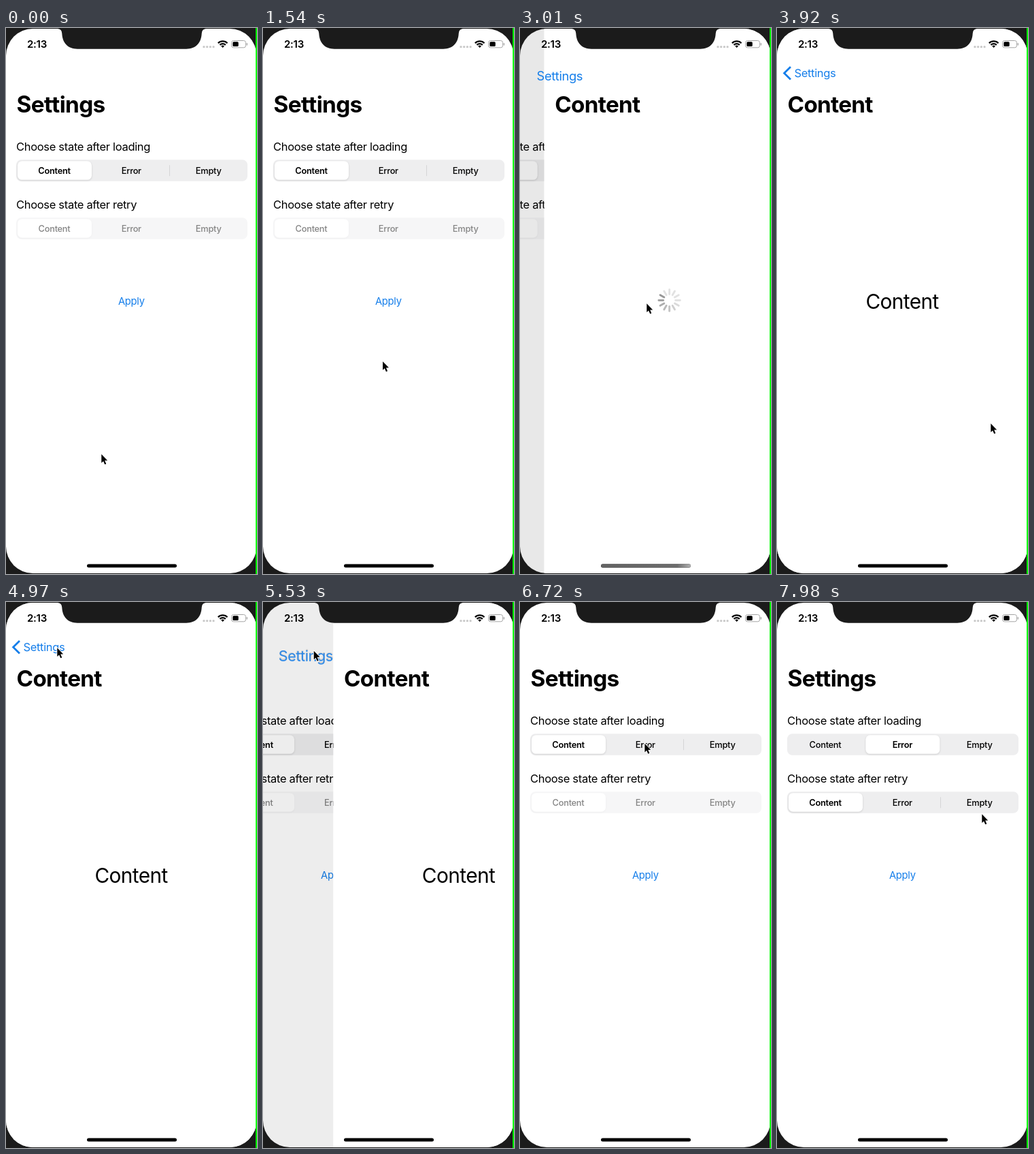
Write an HTML page with a canvas that moves like this. It is 369 px wide and 801 px high and loops after 8000 ms.

```html
<!DOCTYPE html>
<html lang="en">
<head>
<meta charset="utf-8">
<title>Settings</title>
<style>
html, body { margin: 0; width: 100%; height: 100%; overflow: hidden; background: #1b1b1b; }
canvas { display: block; width: 369px; height: 801px; }
</style>
</head>
<body>
<canvas id="stage"></canvas>
<script>
const W = 369, H = 801, LOOP = 8000, STEP = 70;
const BLUE = '#157eea';
const FONT = 'Inter, Roboto, "Liberation Sans", sans-serif';
const PUSH = 2784, POP = 5470, PICK = 6930;

const canvas = document.getElementById('stage');
const ratio = window.devicePixelRatio || 1;
canvas.width = W * ratio;
canvas.height = H * ratio;
const ctx = canvas.getContext('2d');

const clamp = v => Math.max(0, Math.min(1, v));
const ramp = (t, from, to) => clamp((t - from) / (to - from));
const mix = (a, b, k) => a + (b - a) * k;

// critically damped spring from 0 to 1
function spring(ms, omega = 17.4) {
  const x = Math.max(0, ms) / 1000 * omega;
  return 1 - (1 + x) * Math.exp(-x);
}

// pointer path: time, x, y
const PATH = [
  [0, 140, 625], [1000, 140, 625], [1820, 189, 407], [2170, 186, 404],
  [3080, 186, 404], [3430, 314, 580], [4220, 314, 580], [4970, 75, 67],
  [5500, 75, 67], [5810, 54, 235], [6790, 185, 207], [7150, 185, 207],
  [7700, 253, 313], [7980, 301, 311], [8000, 301, 311]
];

function slope(i, axis) {
  const a = PATH[i - 1], b = PATH[i], c = PATH[i + 1];
  if (!a || !c) return 0;
  const before = b[axis] - a[axis], after = c[axis] - b[axis];
  return before * after <= 0 ? 0 : (before + after) / (c[0] - a[0]);
}

function pointer(t) {
  let i = 0;
  while (i < PATH.length - 2 && t >= PATH[i + 1][0]) i++;
  const a = PATH[i], b = PATH[i + 1], d = b[0] - a[0], u = (t - a[0]) / d;
  return [1, 2].map(axis => {
    const ease = u * u * (3 - 2 * u);
    return mix(a[axis], b[axis], ease)
      + d * u * (1 - u) * ((1 - u) * slope(i, axis) - u * slope(i + 1, axis));
  });
}

function text(str, x, y, size, { weight = 400, color = '#000', align = 'left' } = {}) {
  ctx.font = `${weight} ${size}px ${FONT}`;
  ctx.letterSpacing = `${-0.02 * size}px`;
  ctx.textAlign = align;
  ctx.fillStyle = color;
  ctx.fillText(str, x, y);
}

function box(x, y, w, h, r, fill) {
  ctx.beginPath();
  ctx.roundRect(x, y, w, h, r);
  ctx.fillStyle = fill;
  ctx.fill();
}

function faded(alpha, draw) {
  if (alpha <= 0) return;
  ctx.save();
  ctx.globalAlpha *= alpha;
  draw();
  ctx.restore();
}

function segments(y, pos, enabled) {
  const part = 340 / 3, picked = Math.round(pos);
  box(15, y, 340, 31.5, 7.5, enabled ? '#eeeeef' : '#f6f6f7');
  if (enabled) {
    for (const i of [1, 2]) {
      const near = Math.min(Math.abs(pos - i), Math.abs(pos - i + 1));
      faded(clamp(near), () => box(Math.floor(14 + part * i), y + 8, 1, 16, 0, '#d4d4d6'));
    }
  }
  ctx.save();
  ctx.shadowColor = `rgba(0,0,0,${enabled ? 0.14 : 0.04})`;
  ctx.shadowBlur = 3 * ratio;
  ctx.shadowOffsetY = ratio;
  box(17 + part * pos, y + 2, 109, 27.5, 6.5, '#fff');
  ctx.restore();
  ['Content', 'Error', 'Empty'].forEach((name, i) =>
    text(name, 71 + part * i, y + 20.5, 12.8, {
      weight: enabled && i === picked ? 600 : 500,
      color: enabled ? '#000' : '#858585',
      align: 'center'
    }));
}

function settingsPage(t, p) {
  ctx.save();
  ctx.translate(-111 * p, 0);
  text('Choose state after loading', 15, 179.8, 16.55);
  segments(193.3, spring(t - PICK, 20), true);
  text('Choose state after retry', 15, 264.8, 16.55);
  segments(278.2, 0, t >= PICK + 70);
  const pressed = t >= 2660 && t < 3000;
  faded(pressed ? 0.2 : 1, () =>
    text('Apply', 184.3, 406, 14.76, { color: BLUE, align: 'center' }));
  ctx.restore();
}

function spinner(t) {
  const head = Math.floor(t / 1000 * 12) + 10;
  ctx.lineWidth = 2.9;
  ctx.lineCap = 'round';
  for (let i = 0; i < 12; i++) {
    const age = ((head - i) % 12 + 12) % 12;
    const g = Math.round(Math.min(226, 152 + age * 11));
    const a = i * Math.PI / 6 - Math.PI / 2;
    ctx.strokeStyle = `rgb(${g},${g},${g})`;
    ctx.beginPath();
    ctx.moveTo(184 + 9 * Math.cos(a), 399.5 + 9 * Math.sin(a));
    ctx.lineTo(184 + 15.7 * Math.cos(a), 399.5 + 15.7 * Math.sin(a));
    ctx.stroke();
  }
}

function contentPage(t, p) {
  const x = (1 - p) * W;
  ctx.fillStyle = `rgba(0,0,0,${0.1 * p})`;
  ctx.fillRect(0, 0, x, H);
  ctx.save();
  ctx.translate(x, 0);
  ctx.fillStyle = '#fff';
  ctx.fillRect(0, 0, W, H);
  text('Content', 15.5, 123.7, 33.2, { weight: 700 });
  const loaded = ramp(t, 3680, 3880);
  faded(1 - loaded, () => spinner(t));
  faded(loaded, () => text('Content', 184, 411.5, 29.8, { align: 'center' }));
  ctx.restore();
}

// the large title shrinks into the back label and grows out of it again
function navTitle(t, p) {
  const width = mix(130, 61, p), x = mix(15.5, 25.5, p), mid = mix(111.6, 66.2, p);
  const turn = ramp(p, 0.15, 0.8);
  const big = width / 130 * 33.4, small = width / 61 * 16.5;
  faded(1 - turn, () => text('Settings', x, mid + big * 0.363, big, { weight: 700 }));
  const held = t >= 5320 && t < POP ? 0.45 : 1;
  faded(turn * held, () => text('Settings', x, mid + small * 0.363, small, { color: BLUE }));
  faded(ramp(p, 0.92, 0.995) * held, () => {
    ctx.strokeStyle = BLUE;
    ctx.lineWidth = 2.8;
    ctx.lineJoin = 'miter';
    ctx.lineCap = 'butt';
    ctx.beginPath();
    ctx.moveTo(20, 57);
    ctx.lineTo(10.6, 66.3);
    ctx.lineTo(20, 75.6);
    ctx.stroke();
  });
}

function statusBar() {
  text('2:13', 31, 29.2, 15.1, { weight: 600 });
  for (let i = 0; i < 4; i++) box(289.3 + i * 4.7, 26, 3.3, 3.3, 1.65, '#c9c9c9');

  ctx.save();
  ctx.translate(318.6, 29);
  ctx.strokeStyle = '#000';
  ctx.lineCap = 'butt';
  ctx.lineWidth = 2.3;
  for (const r of [9.6, 5.9]) {
    ctx.beginPath();
    ctx.arc(0, 0, r, -Math.PI * 0.75, -Math.PI * 0.25);
    ctx.stroke();
  }
  ctx.fillStyle = '#000';
  ctx.beginPath();
  ctx.moveTo(0, 0);
  ctx.arc(0, 0, 3.4, -Math.PI * 0.75, -Math.PI * 0.25);
  ctx.fill();
  ctx.restore();

  ctx.strokeStyle = '#a4a4a4';
  ctx.lineWidth = 1;
  ctx.beginPath();
  ctx.roundRect(331.5, 18.5, 21, 10.3, 3);
  ctx.stroke();
  box(333.3, 20.2, 8.4, 6.9, 1.5, '#000');
  box(353.7, 22, 1.3, 3.6, 0.6, '#a4a4a4');
}

function notch() {
  ctx.fillStyle = '#1b1b1b';
  ctx.beginPath();
  ctx.moveTo(76, 0);
  ctx.lineTo(76, 1);
  ctx.quadraticCurveTo(82, 1.5, 82.3, 8);
  ctx.bezierCurveTo(83, 22, 91, 30.7, 105, 30.7);
  ctx.lineTo(265, 30.7);
  ctx.bezierCurveTo(279, 30.7, 287, 22, 287.7, 8);
  ctx.quadraticCurveTo(288, 1.5, 294, 1);
  ctx.lineTo(294, 0);
  ctx.fill();
}

function homeBar(t) {
  const bar = fill => box(119, 786.5, 132, 5, 2.5, fill);
  bar('#000');
  faded(ramp(t, 2650, 2740) * (1 - ramp(t, 3430, 3640)), () => {
    const g = ctx.createLinearGradient(119, 0, 251, 0);
    g.addColorStop(0, '#626262');
    g.addColorStop(0.85, '#6c6c6c');
    g.addColorStop(1, '#b0b0b0');
    bar(g);
  });
}

function arrow(x, y) {
  ctx.save();
  ctx.translate(x, y);
  ctx.beginPath();
  ctx.moveTo(0.3, 0.3);
  ctx.lineTo(0.3, 13);
  ctx.lineTo(3.1, 10.4);
  ctx.lineTo(5.2, 15.3);
  ctx.lineTo(7.3, 14.4);
  ctx.lineTo(5.2, 9.6);
  ctx.lineTo(9.2, 9.4);
  ctx.closePath();
  ctx.strokeStyle = '#fff';
  ctx.lineJoin = 'round';
  ctx.lineWidth = 1.8;
  ctx.stroke();
  ctx.fillStyle = '#000';
  ctx.fill();
  ctx.restore();
}

function draw(t) {
  const p = t < POP ? spring(t - PUSH) : 1 - spring(t - POP);
  ctx.setTransform(ratio, 0, 0, ratio, 0, 0);
  ctx.fillStyle = '#1b1b1b';
  ctx.fillRect(0, 0, W, H);

  ctx.save();
  ctx.beginPath();
  ctx.roundRect(0, 1, 368.5, 799, 39.5);
  ctx.clip();
  ctx.fillStyle = '#fff';
  ctx.fillRect(0, 0, W, H);
  settingsPage(t, p);
  if (p > 0.001) contentPage(t, p);
  navTitle(t, p);
  statusBar();
  homeBar(t);
  ctx.restore();

  notch();
  ctx.fillStyle = '#00ff00';
  ctx.fillRect(367, 0, 2, H);
  arrow(...pointer(t));
}

function frame() {
  const t = performance.now() % LOOP;
  draw(Math.floor(t / STEP) * STEP);
  requestAnimationFrame(frame);
}
frame();
</script>
</body>
</html>
```
